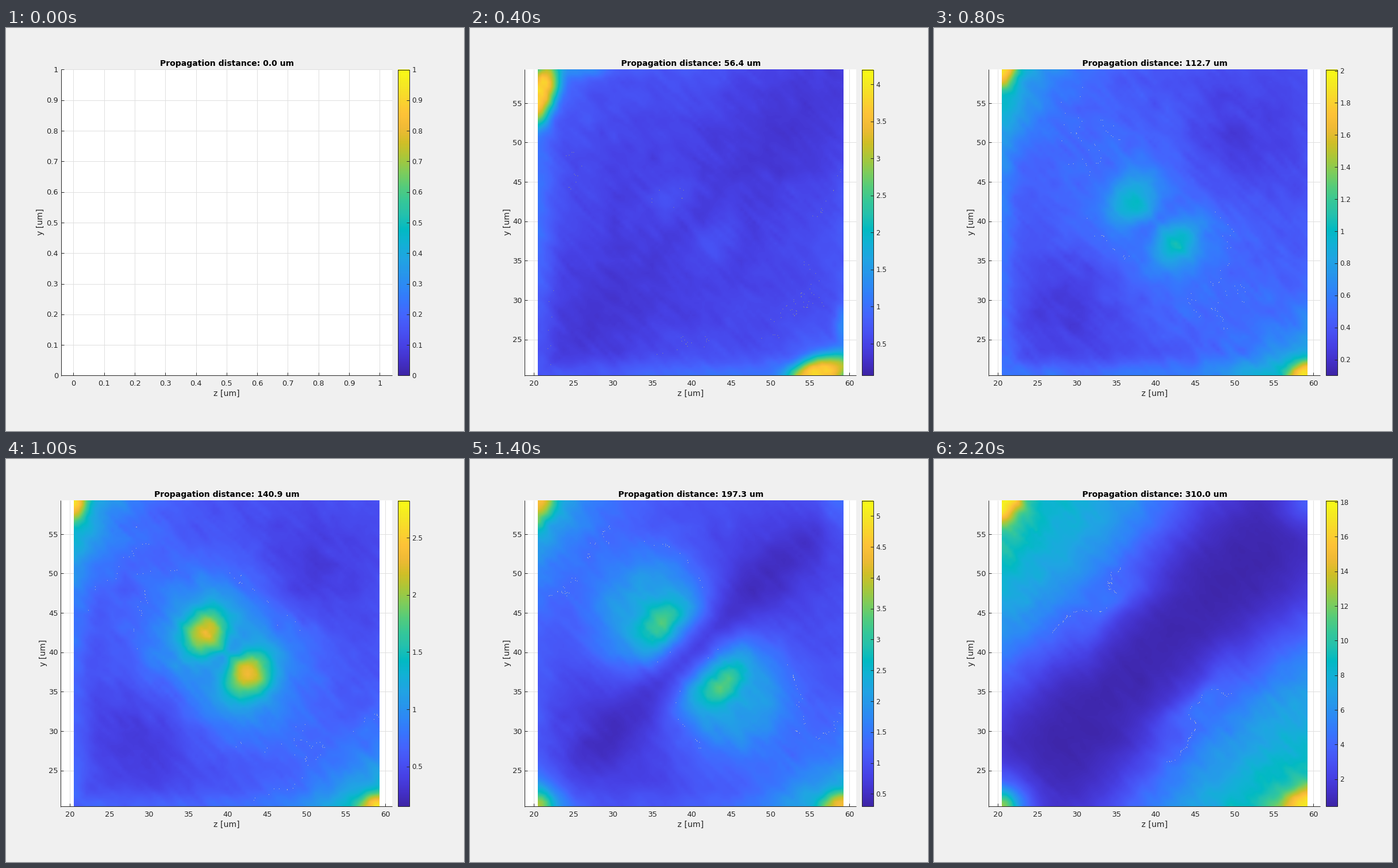
Write a matplotlib script that moves like this. It is 797 px wide and 702 px high and loops after 2400 ms.

```python
import numpy as np
import matplotlib.pyplot as plt
from matplotlib.animation import FuncAnimation
from matplotlib.colors import LinearSegmentedColormap
from matplotlib.patches import Rectangle

W, H, DPI = 797, 702, 64
PX = 72 / DPI
FRAMES, STEP_MS, RANGE_UM = 12, 200, 310.0
LEFT, RIGHT, TOP, BOTTOM = 118, 650, 72, 605
INK = "#262626"
N, SIDE = 73, 38.75

PARULA = LinearSegmentedColormap.from_list("parula", (
    "#3E26A8 #4432CB #4741E5 #4852F4 #4563FD #3875FE #2E87F7 #2797EB "
    "#20A5E3 #12B1D6 #02BAC3 #24C1AE #37C897 #57CC7A #81CC59 #ABC739 "
    "#D1BF27 #F0BA36 #FEC338 #FAD62D #F5E924 #F9FB15").split(), 256)

# Key steps of the colour limits; between them the limits change exponentially
KEYS = [1, 2, 3, 5, 7, 9, 11]
LOW = [.07, .07, .067, .15, .295, .36, .425]
HIGH = [42.4, 4.2, 1.427, 2.824, 5.25, 9.09, 18.08]

# The field is symmetric across z = y, so it is built on one folded half:
# A and B are the distances from the left and top edges, S and D run
# along and across the diagonal, R and ANGLE are polar around the centre.
axis_um = np.linspace(0, SIDE, N)
Z, Y = np.meshgrid(axis_um, axis_um)
A, B = np.minimum(Z, Y), SIDE - np.maximum(Z, Y)
S, D = (Z + Y - SIDE) / 2 ** .5, abs(Y - Z) / 2 ** .5
R, ANGLE = np.hypot(S, D), np.arctan2(S, D)


def near(x, width):
    return np.exp(-(x / width) ** 2)


def oval(x, y, rx, ry, sharp=1.0):
    return np.exp(-((x / rx) ** 2 + (y / ry) ** 2) ** sharp)


def ramp(k, start, end):
    return min(max((k - start) / (end - start), 0), 1)


def limits(k):
    if k == 0:
        return 0, 1
    return [np.exp(np.interp(k, KEYS, np.log(v))) for v in (LOW, HIGH)]


def hat(n, m):
    """Matrix that stretches m samples linearly to n."""
    x = np.linspace(0, m - 1, n)[:, None]
    return np.clip(1 - abs(x - np.arange(m)), 0, 1)


def ripple(seed):
    """Blotchy noise, streaked from upper left to lower right."""
    rng = np.random.default_rng(seed)
    fine = rng.normal(size=(N, N))
    fine = sum(np.roll(fine, (-i, i), (0, 1)) for i in range(4)) / 2
    fine = (fine + np.roll(fine, 1, 0) + np.roll(fine, 1, 1)) / 1.8
    coarse = hat(N, 25) @ rng.normal(size=(25, 25)) @ hat(N, 25).T
    return .6 * fine + .8 * coarse


def start_glow():
    """Glowing edges before the beam has formed."""
    def side(x, y):
        return np.exp(-x / 8) * near(y - SIDE / 2, 11)
    return .16 * side(A, B) + .15 * side(B, A) + .25 * oval(A - 6.5, B, 2.4, 1)


def hot_spot(k, fall):
    """Starts on the left edge and slides into the corner."""
    turn = np.radians(72)
    da, up = A - .7 * fall, 6.3 * fall - B
    along = da * np.cos(turn) + up * np.sin(turn)
    across = da * np.sin(turn) - up * np.cos(turn)
    grow = .12 * max(k - 3, 0)
    return (.36 + .5 * fall) * oval(along, across, 2.5 + 3.5 * fall + grow,
                                    1.5 + 1.1 * fall + grow, 1.5)


def field(k):
    born, last = ramp(k, 1, 3), ramp(k, 9, 11)
    fall, late = 1 - born, ramp(k, 5, 7)
    past = max(k - 5, 0)

    v = .01 + .12 * born - .08 * last
    v = v + fall * start_glow() + hot_spot(k, fall)

    # Glow around the corner and along the edges
    corner = np.hypot(A, B)
    v += born * (.16 * oval(A, B, 4.5, 7) + .15 * (1 - last) * near(corner, 12))
    edge = near(A, 1.8) + .6 * near(B, 1) * np.exp(-A / 15)
    v += .15 * born * 2 ** (-max(k - 3, 0) / 2) * edge

    # A focused disc splits into two halves that drift to the corners
    h = past / 2
    size = 7.5 + 2 * abs(k - 7)
    halo = oval(S, D - 6.8 * h - .5 * h * h, size * (1 + (past / 6) ** 2), size, 1.5)
    v += ramp(k, 3, 5) * (.22 + .16 * last) * halo

    # Inner lobes widen into crescents
    lobe = near(R - 3.7 - .8 * past, 2.8 - .17 * past) * near(ANGLE, .8)
    v += born * (.09 + .42 * near(k - 5.5, 1.6)) * lobe

    # Dark valley and two dark patches on the diagonal
    v *= 1 - .75 * ramp(k, 5, 8) * near(D, 1 + .9 * past)
    v *= 1 - .5 * born * near(abs(S) - 14, 7) * near(D, 7)

    low_corner = np.hypot(A, SIDE - B)
    v += late * .33 * (near(low_corner, 4) + near(low_corner, 1.8))
    v += late * .15 * near(np.hypot(SIDE - A, B), 3.4)
    return v + born * ripple(k) * (.03 / k + .03 * v)


def picture(k):
    """RGB map of the field at step k, with specks along a level line."""
    v = np.clip(field(k), .004, 1)
    v = (hat(BOTTOM - TOP, N) @ v @ hat(RIGHT - LEFT, N).T)[::-1]
    rgb = PARULA(v)[..., :3]

    rng = np.random.default_rng(k)
    born = ramp(k, 1, 3)
    r, c = np.indices(v.shape)
    gate = np.sin(c / 37 + k) + np.cos(r / 43 - 2 * k) > .1
    rows, cols = np.nonzero((abs(v - .035 - .18 * born) < .002) & gate)
    if len(rows):
        pick = rng.choice(len(rows), min(110, len(rows)), replace=False)
        rgb[rows[pick], cols[pick]] = .38 + .38 * born
    return rgb


maps = [None] + [picture(k) for k in range(1, FRAMES)]

fig = plt.figure(figsize=(W / DPI, H / DPI), dpi=DPI, facecolor="#F0F0F0")
ax = fig.add_axes([0, 0, 1, 1])


def line(x, y, color=INK, z=3):
    ax.plot(x, y, color=color, lw=PX, zorder=z, solid_capstyle="butt")


def label(x, y, s, size, ha="center", **kw):
    kw = {"color": INK, **kw}
    ax.text(x, y, s, fontsize=size * PX, family="DejaVu Sans", ha=ha,
            va="baseline", zorder=5, **kw)


def show(img, x0, x1):
    ax.imshow(img, extent=(x0, x1, BOTTOM, TOP), aspect="auto",
              interpolation="nearest", zorder=2)


def ticks_for(lo, hi):
    """At most ten steps of a round size."""
    steps = [m * 10.0 ** e for e in range(-2, 3) for m in (1, 2, 5)]
    step = next(s for s in steps if (hi - lo) / s <= 10.001)
    first, last = np.ceil(lo / step - 1e-6), np.floor(hi / step + 1e-6)
    return np.arange(first, last + 1) * step + 0.0


def draw_axes(k):
    if k == 0:
        left, xticks = 96.5, np.arange(11) / 10
        yticks = xticks
        xs, ys = 117.4 + 533 * xticks, 605.4 - 533 * yticks
    else:
        left, unit, mid = 95.5, 13.725, 39.87
        xticks, yticks = np.arange(20, 61, 5), np.arange(25, 56, 5)
        xs, ys = 384 + (xticks - mid) * unit, 338.5 - (yticks - mid) * unit

    ax.add_patch(Rectangle((left, TOP), 672 - left, BOTTOM - TOP,
                           fc="white", ec="none", zorder=0))
    for x, t in zip(xs, xticks):
        line([x, x], [TOP, BOTTOM], "#DFDFDF", 1)
        line([x, x], [BOTTOM - 5, BOTTOM], z=1.5)
        label(x, 623, f"{t:g}", 13)
    for y, t in zip(ys, yticks):
        line([left, 672], [y, y], "#DFDFDF", 1)
        line([left, left + 5], [y, y], z=1.5)
        label(91, y + 4.7, f"{t:g}", 13, "right")
    line([left, left], [TOP, BOTTOM + 1])
    line([left, 672], [605.4, 605.4])
    label(384.3, 641, "z [um]", 14)
    label(64 if k == 0 else 69, 338, "y [um]", 14,
          rotation=90, rotation_mode="anchor")


def draw_colorbar(lo, hi):
    show(PARULA(np.linspace(1, 0, BOTTOM - TOP))[:, None, :3], 682.5, 702.5)
    line([682.5, 702.5, 702.5, 682.5, 682.5], [72.5, 72.5, 605.4, 605.4, 72.5])
    for t in ticks_for(lo, hi):
        y = 605.4 - 532.9 * (t - lo) / (hi - lo)
        line([697.5, 702.5], [y, y])
        label(706.5, y + 4.6, f"{t:g}", 12, "left")


def draw(k):
    ax.clear()
    ax.set(xlim=(0, W), ylim=(H, 0))
    ax.axis("off")
    draw_axes(k)
    if maps[k] is not None:
        show(maps[k], LEFT, RIGHT)
    draw_colorbar(*limits(k))
    distance = RANGE_UM * k / (FRAMES - 1)
    label(384.3, 66, f"Propagation distance: {distance:.1f} um", 14,
          weight="bold", color="black")
    return []


anim = FuncAnimation(fig, draw, frames=FRAMES, interval=STEP_MS,
                     init_func=lambda: [], repeat=True, repeat_delay=0)
plt.show()
```
